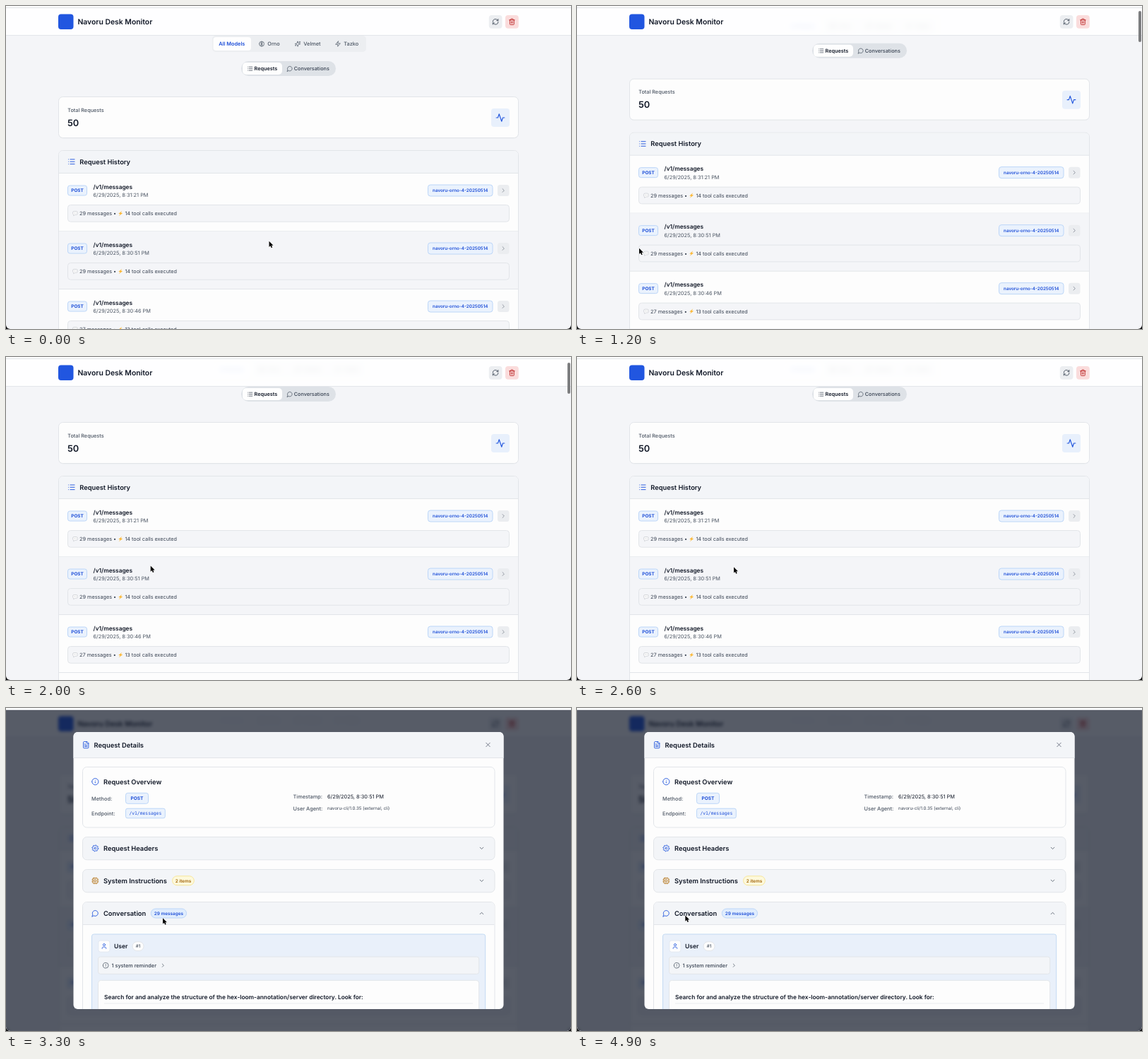
Animation of 800 by 457 pixels, one loop 5 s. Source, as an HTML page:

```html
<!DOCTYPE html>
<html lang="en">
<head>
<meta charset="utf-8">
<title>Request monitor</title>
<style>
  html, body { margin: 0; width: 100%; height: 100%; overflow: hidden; background: #0b0c0e; }
  #stage { position: absolute; left: 0; top: 0; width: 800px; height: 457px; overflow: hidden;
    border-radius: 0 0 6px 6px; background: #f4f5f8; }
  svg { position: absolute; left: 0; top: 0; display: block; }
  text { font-family: Inter, "Open Sans", sans-serif; text-rendering: geometricPrecision; white-space: pre; }
  text.mono { font-family: "DejaVu Sans Mono", "Liberation Mono", monospace; }
  #bar { position: absolute; left: 0; top: 3px; width: 800px; height: 38px; background: rgba(255,255,255,.88);
    border-bottom: 1px solid #e3e6ea; backdrop-filter: blur(4px); }
  #thumb { position: absolute; left: 795px; width: 4px; height: 44px; border-radius: 2px; background: #7c7d7f; }
  #shade { position: absolute; left: 0; top: 3px; width: 800px; height: 454px;
    background: rgba(17,24,39,.7); backdrop-filter: blur(2.2px); }
  #strip { position: absolute; left: 0; top: 0; width: 800px; height: 2px; background: #fcfdfd;
    border-bottom: 1px solid #e2e4e7; }
</style>
</head>
<body>
<div id="stage">
  <svg id="page" width="800" height="457"></svg>
  <div id="bar"></div>
  <svg id="head" width="800" height="457"></svg>
  <div id="thumb"></div>
  <div id="shade"></div>
  <svg id="modal" width="800" height="457"></svg>
  <div id="strip"></div>
  <svg id="pointer" width="800" height="457"></svg>
</div>
<script>
const $ = id => document.getElementById(id);

const INK = '#111827', DARK = '#374151', MID = '#4b5563', SOFT = '#6b7280';
const BLUE = '#1d4ed8', ICON = '#2458de', SKY = '#eaf2fd', SKY_LINE = '#bcd6f8';
const PAPER = '#fdfdfd', PANEL = '#f3f5f8', LINE = '#e2e5e9', AMBER = '#a16207';

const circle = r => `M${12 - r} 12a${r} ${r} 0 1 0 ${2 * r} 0a${r} ${r} 0 1 0 ${-2 * r} 0`;

function gear() {
  let d = '';
  for (let i = 0; i < 32; i++) {
    const a = (i + .5) * Math.PI / 16, r = i % 4 < 2 ? 10.3 : 7.9;
    d += (i ? 'L' : 'M') + (12 + r * Math.cos(a)).toFixed(2) + ' ' + (12 + r * Math.sin(a)).toFixed(2);
  }
  return d + 'z' + circle(3);
}

// icons on a 24 unit grid
const ICONS = {
  pulse: 'M22 12h-4l-3 9L9 3l-3 9H2',
  list: 'M3 5h.01M3 12h.01M3 19h.01M8 5h13M8 12h13M8 19h13',
  refresh: 'M3 12a9 9 0 0 1 9-9 9.75 9.75 0 0 1 6.74 2.74L21 8M21 3v5h-5M21 12a9 9 0 0 1-9 9 9.75 9.75 0 0 1-6.74-2.74L3 16M8 16H3v5',
  trash: 'M3 6h18M19 6v14a2 2 0 0 1-2 2H7a2 2 0 0 1-2-2V6M8 6V4a2 2 0 0 1 2-2h4a2 2 0 0 1 2 2v2M10 11v6M14 11v6',
  brain: circle(9.5) + 'M12 3v18M8 8a3 3 0 0 0 4 2M16 8a3 3 0 0 1-4 2M8 16a3 3 0 0 1 4-2M16 16a3 3 0 0 0-4-2',
  sparkle: 'M9.9 15.5A2 2 0 0 0 8.5 14L2.4 12.5a.5.5 0 0 1 0-1L8.5 9.9A2 2 0 0 0 9.9 8.5L11.5 2.4a.5.5 0 0 1 1 0L14 8.5A2 2 0 0 0 15.5 9.9L21.6 11.5a.5.5 0 0 1 0 1L15.5 14a2 2 0 0 0-1.4 1.5L12.5 21.6a.5.5 0 0 1-1 0zM20 3v4M22 5h-4M4 17v2M5 18H3',
  zap: 'M13 2L3 14h9l-1 8 10-12h-9z',
  bubble: 'M7.9 20A9 9 0 1 0 4 16.1L2 22Z',
  file: 'M15 2H6a2 2 0 0 0-2 2v16a2 2 0 0 0 2 2h12a2 2 0 0 0 2-2V7zM14 2v4a2 2 0 0 0 2 2h4M10 9H8M16 13H8M16 17H8',
  gear: gear(),
  chip: 'M6 4h12a2 2 0 0 1 2 2v12a2 2 0 0 1-2 2H6a2 2 0 0 1-2-2V6a2 2 0 0 1 2-2zM9 9h6v6H9zM9 2v2M15 2v2M9 20v2M15 20v2M2 9h2M2 15h2M20 9h2M20 15h2',
  info: circle(10) + 'M12 16v-4M12 8h.01',
  alert: circle(10) + 'M12 8v4M12 16h.01',
  user: 'M19 21v-2a4 4 0 0 0-4-4H9a4 4 0 0 0-4 4v2M16 7a4 4 0 1 1-8 0 4 4 0 0 1 8 0z',
  right: 'M9 18l6-6-6-6', down: 'M6 9l6 6 6-6', up: 'M18 15l-6-6-6 6',
  close: 'M18 6L6 18M6 6l12 12'
};

// cx, cy is the centre of the icon
const icon = (name, cx, cy, size, color) =>
  `<path d="${ICONS[name]}" transform="translate(${cx - size / 2} ${cy - size / 2}) scale(${size / 24})"
    fill="none" stroke="${color}" stroke-width="2" stroke-linecap="round" stroke-linejoin="round"/>`;

const box = (x, y, x2, y2, r, fill, line) =>
  `<rect x="${x}" y="${y}" width="${x2 - x}" height="${y2 - y}" rx="${r}" fill="${fill}"` +
  (line ? ` stroke="${line}" stroke-width="1"/>` : '/>');

const text = (s, x, y, size, weight, color, more = '') =>
  `<text x="${x}" y="${y}" font-size="${size}" font-weight="${weight}" fill="${color}" ${more}>${s}</text>`;

const mid = (s, x, y, size, weight, color) => text(s, x, y, size, weight, color, 'text-anchor="middle"');

const rule = (x, x2, y, color = LINE) =>
  `<path d="M${x} ${y}H${x2}" stroke="${color}" stroke-width="1"/>`;

function row(i, time, messages, calls) {
  const y = 236.5 + 82 * i;
  return `<g transform="translate(0 ${y})">` +
    (i === 1 ? box(75, 0, 725, 82, 0, '#f4f5f8') : '') +
    rule(75, 725, 82) +
    box(87.5, 17.5, 114.5, 31.5, 3, SKY, SKY_LINE) +
    mid('POST', 101, 26.8, 6.4, 700, BLUE) +
    text('/v1/messages', 123.5, 22.2, 8.3, 600, INK) +
    text(`6/29/2025, ${time} PM`, 123.5, 33.6, 7.35, 400, MID) +
    box(597.5, 16.5, 689, 32.5, 3.5, SKY, SKY_LINE) +
    mid('navoru-orno-4-20250514', 643.3, 26.8, 6.3, 600, BLUE) +
    box(696, 16.5, 712.5, 32.5, 3.5, '#ebedf0') +
    icon('right', 704.2, 24.5, 9.4, '#7b828e') +
    box(87.5, 45, 712.5, 68.7, 4, '#f4f5f8', LINE) +
    `<path d="M94.6 55.6a1.6 1.6 0 0 1 1.6-1.6h3.4a1.6 1.6 0 0 1 1.6 1.6v1.6a1.6 1.6 0 0 1-1.6 1.6h-2.2l-1.7 1.4v-1.5a1.6 1.6 0 0 1-1.1-1.5z"
      fill="#fff" stroke="#b9bdc3" stroke-width=".6"/>
     <path d="M96.3 56.4h3.3" stroke="#a4a8ae" stroke-width=".7" stroke-dasharray=".7 .6"/>` +
    text(`${messages} messages •`, 104, 59.6, 7.3, 400, DARK) +
    `<path d="M164.4 53.2l-5.2 4.2 2.6.3-2.2 3 5.6-4.3-2.7-.3z" fill="#fbb62f"/>` +
    text(`${calls} tool calls executed`, 168.4, 59.6, 7.25, 400, DARK) +
    '</g>';
}

const tab = (name, mark, x) =>
  icon(mark, x + 4, 53.6, 8.8, MID) + text(name, x + 12.3, 56.2, 7.35, 500, MID);

$('page').innerHTML = '<g id="scroll">' +
  box(292, 42, 510, 65, 5, '#eceef1') +
  box(293.5, 44, 347, 63, 4, '#fefefe') +
  text('All Models', 301.2, 56.2, 7.35, 600, BLUE) +
  tab('Orno', 'brain', 358) + tab('Velmet', 'sparkle', 409) + tab('Tazko', 'zap', 466) +
  box(333, 78, 467, 99, 10.5, '#dee2e7') +
  box(335, 80, 391, 97, 5, '#fefefe') +
  icon('list', 345.5, 88.7, 8.6, DARK) +
  text('Requests', 351.5, 91.2, 7.25, 600, INK) +
  icon('bubble', 401.8, 88.7, 8.8, MID) +
  text('Conversations', 407.8, 91.2, 7.25, 500, DARK) +
  box(74.5, 129.1, 725.5, 187.4, 6, '#eceef1') +
  box(74.5, 128.5, 725.5, 186.5, 6, PAPER, LINE) +
  text('Total Requests', 87.2, 149.8, 7.3, 500, MID) +
  text('50', 87, 169.8, 12.8, 600, INK) +
  box(687, 145, 713, 171, 4, '#e8f0fc') +
  icon('pulse', 700, 158, 14, ICON) +
  box(74.5, 204.5, 725.5, 600, 6, PAPER, LINE) +
  `<path d="M75 236.5V210.5a5.5 5.5 0 0 1 5.500-5.500H719.500a5.500 5.500 0 0 1 5.500 5.500V236.500z" fill="${PANEL}"/>` +
  rule(75, 725, 236.5) +
  icon('list', 92.8, 220.3, 11.4, ICON) +
  text('Request History', 104.3, 223.6, 9.3, 600, INK) +
  row(0, '8:31:21', 29, 14) + row(1, '8:30:51', 29, 14) +
  row(2, '8:30:46', 27, 13) + row(3, '8:30:39', 25, 12) + '</g>';

$('head').innerHTML =
  box(74, 11.5, 95.5, 33, 4, '#2156e0') +
  text('Navoru Desk Monitor', 101.4, 25.8, 10.4, 600, INK) +
  box(683.8, 13, 702.5, 31.7, 4, '#eceef1') + icon('refresh', 693.1, 22.3, 10, DARK) +
  box(707, 13, 725.8, 31.7, 4, '#fadcdc') + icon('trash', 716.4, 22.3, 10, '#b91c1c');

function fold(y, mark, label, color, arrow) {
  return icon(mark, 126.3, y, 10.6, color) + text(label, 138, y + 3.5, 9.33, 600, INK) +
    icon(arrow, 673.5, y, 9.4, MID);
}

$('modal').innerHTML =
  '<defs><clipPath id="sheet">' + box(95.5, 34, 704.5, 426, 6, '#fff') + '</clipPath></defs>' +
  '<g clip-path="url(#sheet)">' +
  box(95, 34, 705, 426, 0, PAPER) +
  box(95, 34, 705, 70.5, 0, PANEL) + rule(95, 705, 70.5) +
  icon('file', 113.2, 52.2, 11, ICON) +
  text('Request Details', 124.6, 55.5, 9.35, 600, INK) +
  icon('close', 682.5, 52, 11, SOFT) +

  box(108.5, 83.5, 692, 169, 6, PAPER, LINE) +
  icon('info', 126.3, 104.2, 11, ICON) +
  text('Request Overview', 138, 107.6, 9.33, 600, INK) +
  text('Method:', 121, 130.6, 7.35, 500, MID) +
  box(169.5, 120.3, 201.5, 135.3, 3, SKY, SKY_LINE) +
  mid('POST', 185.5, 130.3, 6.5, 700, BLUE) +
  text('Endpoint:', 121, 151.6, 7.35, 500, MID) +
  box(169.5, 142.2, 225.3, 155.8, 2.5, SKY, SKY_LINE) +
  text('/v1/messages', 174.4, 151.2, 6.35, 400, BLUE, 'class="mono"') +
  text('Timestamp:', 406.5, 128, 7.35, 500, MID) +
  text('6/29/2025, 8:30:51 PM', 455, 128, 7.4, 400, INK) +
  text('User Agent:', 406.5, 144.7, 7.35, 500, MID) +
  text('navoru-cli/1.0.35 (external, cli)', 455, 144.4, 6.2, 400, DARK) +

  box(108.5, 182.5, 692, 214.8, 6, PANEL, LINE) +
  fold(198.4, 'gear', 'Request Headers', ICON, 'down') +
  box(108.5, 228.5, 692, 260.8, 6, PANEL, LINE) +
  fold(244.4, 'chip', 'System Instructions', '#b7791f', 'down') +
  box(235.5, 237.8, 266.3, 250.8, 6.5, '#fdf9dc', '#f6e59a') +
  mid('2 items', 250.9, 246.6, 6.4, 600, AMBER) +

  box(108.5, 274.5, 692, 480, 6, PAPER, LINE) +
  `<path d="M109 306.500V280.500a5.500 5.500 0 0 1 5.500-5.500H686a5.500 5.500 0 0 1 5.500 5.500V306.500z" fill="${PANEL}"/>` +
  rule(109, 691.5, 306.5) +
  fold(290.5, 'bubble', 'Conversation', ICON, 'up') +
  box(205.3, 284, 255.5, 297, 6.5, '#e0edfd', SKY_LINE) +
  mid('29 messages', 230.4, 292.8, 6.4, 600, BLUE) +

  box(121.5, 320, 678.7, 480, 3, '#e9f0fa', '#c3daf3') +
  box(130.8, 329, 147, 345.2, 3, PAPER, '#e2e8f1') +
  icon('user', 138.9, 337, 9.4, ICON) +
  text('User', 153, 340.1, 8.5, 600, INK) +
  box(179, 330.7, 195, 343.5, 6.4, PAPER, LINE) +
  mid('#1', 187, 339.4, 6.3, 500, MID) +
  box(130.5, 352, 669.7, 376.3, 3, PANEL, LINE) +
  icon('alert', 141.2, 364.2, 9.2, MID) +
  text('1 system reminder', 149.5, 366.9, 7.3, 500, DARK) +
  icon('right', 222.3, 364.2, 8.6, MID) +
  box(130.5, 385.3, 669.7, 480, 4, PAPER, LINE) +
  text('Search for and analyze the structure of the hex-loom-annotation/server directory. Look for:',
    139, 411.8, 8.33, 600, INK) +
  rule(139, 661, 418, '#e9ebee') + '</g>';

$('pointer').innerHTML =
  `<path id="arrow" d="M0 0V8.300L1.900 6.600 3.200 9.500 4.700 8.800 3.500 6.100H6z"
    fill="#050505" stroke="#fff" stroke-width=".9" stroke-linejoin="round" paint-order="stroke"/>`;

// pointer stops: ms, x, y
const STOPS = [
  [0, 372.5, 332.7], [600, 88, 342.7], [1400, 88, 342.7], [2000, 204.700, 295.5],
  [2500, 222, 297.2], [3700, 222, 297.2], [4300, 162, 292.5], [4900, 153.3, 293.5]
];
const clamp = v => Math.max(0, Math.min(1, v));
const smooth = k => k * k * (3 - 2 * k);

function pointerAt(t) {
  const i = Math.max(1, STOPS.findIndex(s => s[0] >= t));
  const [t0, x0, y0] = STOPS[i - 1], [t1, x1, y1] = STOPS[i];
  const k = smooth(clamp((t - t0) / (t1 - t0)));
  return [x0 + (x1 - x0) * k, y0 + (y1 - y0) * k];
}

const scrollAt = t => 36 * (1 - Math.pow(1 - clamp((t - 1000) / 600), 3));

function draw(now) {
  const t = Math.floor(now % 5000 / 100) * 100;
  const y = scrollAt(t), [px, py] = pointerAt(t), open = t >= 3300;
  $('scroll').setAttribute('transform', `translate(0 ${-y})`);
  $('arrow').setAttribute('transform', `translate(${px} ${py})`);
  $('thumb').style.top = 4.5 + y * .1 + 'px';
  $('thumb').style.opacity = y > 0 ? 1 - clamp((t - 2000) / 400) : 0;
  $('shade').style.display = $('modal').style.display = open ? 'block' : 'none';
}

const start = performance.now();
function tick() {
  draw(performance.now() - start);
  requestAnimationFrame(tick);
}
tick();
</script>
</body>
</html>
```
